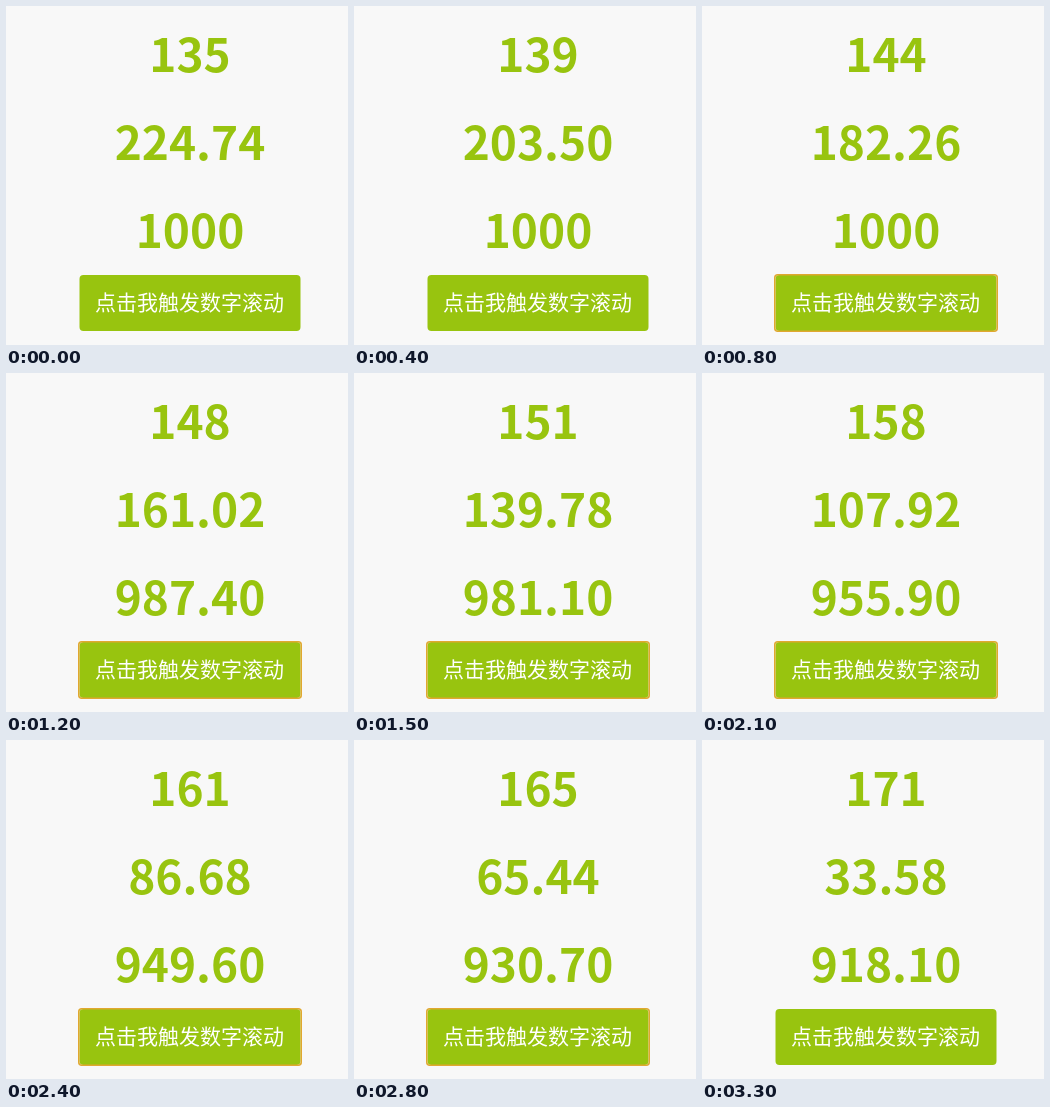
An HTML page for the animation above (3400 ms loop, 342 by 339 pixels).

```html
<!DOCTYPE html>
<html lang="zh">
<head>
<meta charset="utf-8">
<title>数字滚动</title>
<style>
  html, body { margin: 0; width: 100%; height: 100%; overflow: hidden; background: #f8f8f8; }
  svg { display: block; }
  text { text-anchor: middle; font-family: "Noto Sans CJK SC", "Noto Sans CJK", sans-serif; }
  .num { font-size: 46px; font-weight: bold; fill: #98c40f; }
  .label { font-size: 21px; fill: #fff; }
</style>
</head>
<body>
<svg width="342" height="339" viewBox="0 0 342 339">
  <text class="num" x="184" y="66"></text>
  <text class="num" x="184" y="154"></text>
  <text class="num" x="184" y="242"></text>
  <rect x="73.5" y="269" width="221" height="56" rx="4" fill="#98c40f"/>
  <rect id="ring" x="72.75" y="268.75" width="222.5" height="56.5" rx="3" fill="none" stroke="#e0a830" stroke-width="1.5"/>
  <text class="label" x="183.5" y="304">点击我触发数字滚动</text>
</svg>
<script>
const LOOP = 3400, FRAME = 100, TICK = 183;
const nums = document.querySelectorAll('.num');
const ring = document.getElementById('ring');

// Whole timer ticks elapsed since start
const ticks = (t, start, period) => Math.max(0, Math.floor((t - start) / period));

function draw(now) {
  const t = Math.floor(now % LOOP / FRAME) * FRAME;
  const drops = ticks(t, 770, TICK);
  nums[0].textContent = 135 + ticks(t, -26, TICK / 2);
  nums[1].textContent = (224.74 - 10.62 * ticks(t, -26, TICK)).toFixed(2);
  nums[2].textContent = drops ? (1000 - 6.3 * drops).toFixed(2) : '1000';
  ring.style.display = t >= 800 && t < 3200 ? '' : 'none';
}

const begin = performance.now();
function loop() {
  draw(performance.now() - begin);
  requestAnimationFrame(loop);
}
loop();
</script>
</body>
</html>
```
